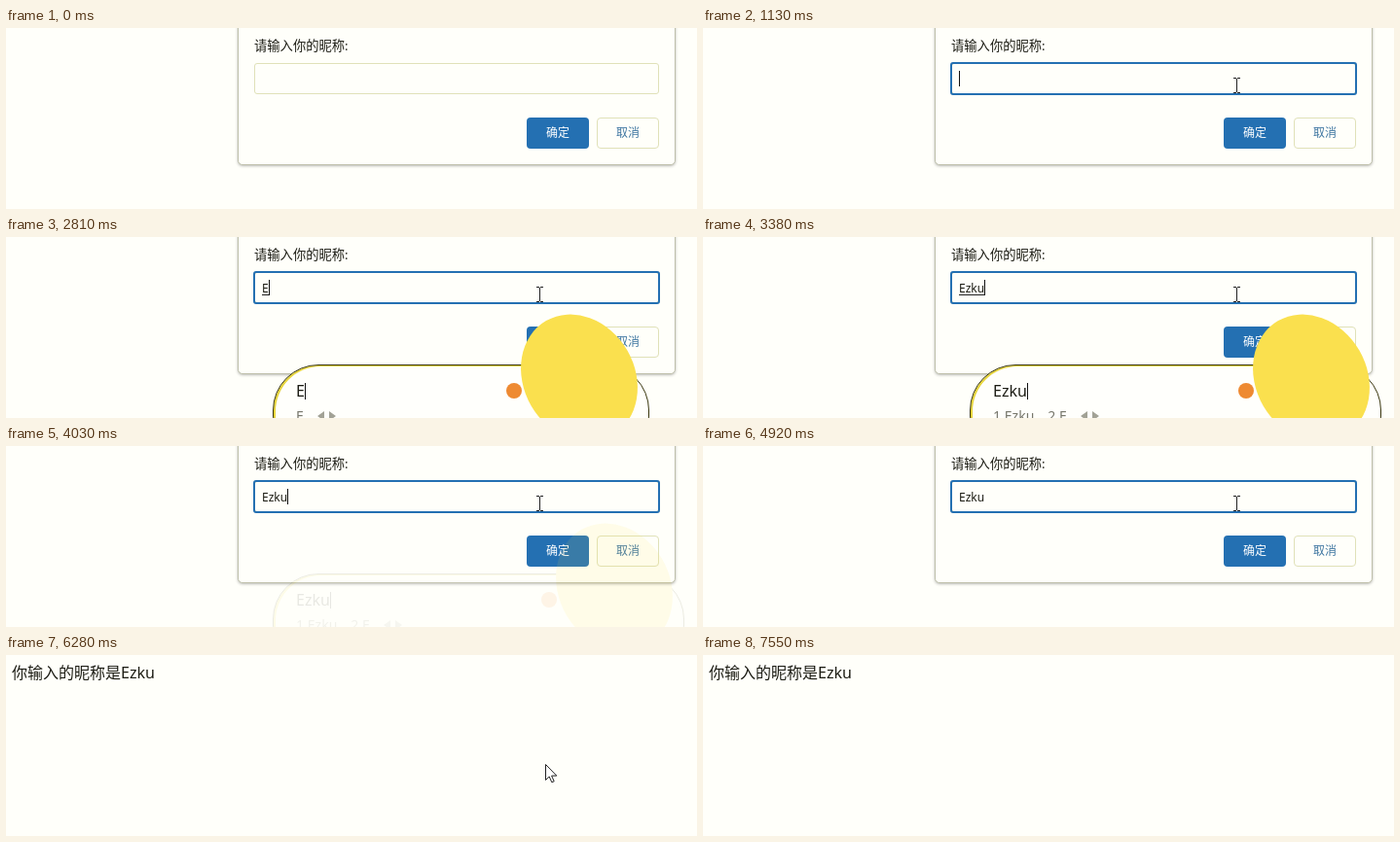
Write an HTML page that moves like this. It is 710 px wide and 186 px high and loops after 8.49 s.

```html
<!DOCTYPE html>
<html lang="zh-CN">
<head>
<meta charset="utf-8">
<title>昵称输入</title>
<style>
  :root { --paper: #fffffa; --blue: #2470b2; --line: #e0e1b8; --loop: 8490ms; }
  html, body { margin: 0; width: 100%; height: 100%; overflow: hidden; background: var(--paper); }
  body { font: 16px/20px 'Noto Sans', 'Noto Sans CJK SC', sans-serif; color: #1c1c14; white-space: nowrap; }
  .stage { position: absolute; left: 0; top: 0; width: 710px; height: 186px; overflow: hidden; }
  .stage div, .mascot, .badge { position: absolute; box-sizing: border-box; }

  /* Every animation shares one loop; percentages are ms / 84.9 */
  .anim, .k { animation: var(--loop) infinite both; }
  .cut, .k { animation-timing-function: step-end; }

  .dialog { inset: 0; animation-name: close; }
  .panel { left: 238px; top: -20px; width: 450px; height: 161px; border: 1px solid #bebfaa;
           border-radius: 5px; background: var(--paper); box-shadow: 0 1px 3px #0004; }
  .title { left: 255px; top: 8px; font-size: 13.3px; }
  .field { left: 255px; top: 36px; width: 416px; height: 32px; border: 1px solid var(--line); border-radius: 3px; }
  .focus { left: 254px; top: 35px; width: 418px; height: 34px; border: 2px solid var(--blue);
           border-radius: 3px; animation-name: focus; }
  .button { top: 92px; width: 64px; height: 32px; border-radius: 4px; font-size: 12px; line-height: 32px; text-align: center; }
  .ok { left: 535px; background: var(--blue); color: #fff; }
  .cancel { left: 607px; border: 1px solid var(--line); line-height: 30px; color: #3d75a0; }

  .entry { left: 263px; top: 46px; height: 14px; font-size: 12px; line-height: 14px;
           border-bottom: 1px solid transparent; animation-name: underline; }
  .caret { right: -1px; top: -2px; width: 1px; height: 16px; background: #111; }
  .entry .caret { animation-name: blink; }

  /* A key's letters take up room only once it has been pressed */
  .k { font-style: normal; line-height: 0; }
  .k1 { animation-name: key1; }
  .k2 { animation-name: key2; }
  .k3 { animation-name: key3; }
  .k4 { animation-name: key4; }

  .popup { inset: 0; animation-name: popup; }
  .pill { left: 274px; top: 131px; height: 100px; border: 1px solid #38350c; border-radius: 47px;
          background: #fffffc; box-shadow: inset 2px 1px 0 #e6d43c; animation-name: widen; }
  .compose { left: 23px; top: 16px; }
  .compose .caret { top: 2px; height: 17px; }
  .choices { left: 23px; top: 43px; font-size: 14px; line-height: 18px; color: #77776c; }
  .second { margin-left: 1em; }
  .pages { margin-left: 14px; fill: #a2a296; }
  .badge { right: 130px; top: 18px; width: 16px; height: 16px; border-radius: 50%; background: #ee8a32; }
  .mascot { right: 14px; top: -55px; width: 114px; height: 136px; border-radius: 50%;
            background: #fae04e; transform: rotate(-30deg); }

  .result { left: 6px; top: 8px; animation-name: result; }
  .pointer { left: 0; top: 0; animation-name: move; animation-timing-function: ease-in-out; }
  .pointer svg { position: absolute; overflow: visible; }
  .arrow { animation-name: arrow; }
  .beam { animation-name: beam; }

  @keyframes close { 0%, 69.61% { opacity: 1 } 73.97%, 100% { opacity: 0 } }
  @keyframes focus { 0%, 12.13% { opacity: 0 } 13.2%, 100% { opacity: 1 } }
  @keyframes underline { 0% { border-color: transparent } 30.39% { border-color: #222 } 44.76%, 100% { border-color: transparent } }
  @keyframes blink {
    0% { opacity: 0 } 12.13% { opacity: 1 } 17.67% { opacity: 0 } 24.26% { opacity: 1 }
    53% { opacity: 0 } 59.13% { opacity: 1 } 65.37%, 100% { opacity: 0 }
  }
  @keyframes key1 { 0% { font-size: 0 } 30.39%, 100% { font-size: 1em } }
  @keyframes key2 { 0% { font-size: 0 } 35.33%, 100% { font-size: 1em } }
  @keyframes key3 { 0% { font-size: 0 } 36.98%, 100% { font-size: 1em } }
  @keyframes key4 { 0% { font-size: 0 } 39.8%, 100% { font-size: 1em } }
  @keyframes popup { 0%, 30.39% { opacity: 0 } 33%, 44.76% { opacity: 1 } 49.12%, 100% { opacity: 0 } }
  @keyframes widen { 0% { width: 387px } 35.33% { width: 403px } 36.98% { width: 415px } 39.8%, 100% { width: 423px } }
  @keyframes result { 0% { opacity: 0 } 71.8%, 100% { opacity: 1 } }
  @keyframes move {
    0%, 2.24% { transform: translate(562px, -20px) }
    9.89%, 60.31% { transform: translate(548px, 59px) }
    67.37%, 82.21% { transform: translate(554px, 112px) }
    88.9%, 100% { transform: translate(572px, 190px) }
  }
  @keyframes arrow { 0% { opacity: 1 } 7% { opacity: 0 } 62.3%, 100% { opacity: 1 } }
  @keyframes beam { 0% { opacity: 0 } 7% { opacity: 1 } 62.3%, 100% { opacity: 0 } }
</style>
</head>
<body>
<div class="stage">
  <div class="result anim cut">你输入的昵称是Ezku</div>

  <div class="dialog anim">
    <div class="panel"></div>
    <div class="title">请输入你的昵称:</div>
    <div class="field"></div>
    <div class="focus anim"></div>
    <div class="entry anim cut"><i class="k k1">E</i><i class="k k2">z</i><i class="k k3">k</i><i class="k k4">u</i><div class="caret anim cut"></div></div>
    <div class="button ok">确定</div>
    <div class="button cancel">取消</div>
  </div>

  <div class="popup anim">
    <div class="pill anim cut">
      <div class="compose"><i class="k k1">E</i><i class="k k2">z</i><i class="k k3">k</i><i class="k k4">u</i><div class="caret"></div></div>
      <div class="choices"><i class="k k2">1.</i><i class="k k1">E</i><i class="k k2">z</i><i class="k k3">k</i><i class="k k4">u</i><i class="k k2 second">2.E</i><svg class="pages" width="20" height="10"><path d="M7 0V10L0 5ZM12 0V10L19 5Z"/></svg></div>
      <span class="badge"></span>
      <span class="mascot"></span>
    </div>
  </div>

  <div class="pointer anim">
    <svg class="arrow anim cut" width="13" height="20"><path d="M.5 .5V16.5L4.2 13L6.8 18.8L9.2 17.8L6.6 12.1H11.8Z" fill="#fff" stroke="#222"/></svg>
    <svg class="beam anim cut" width="8" height="16"><path d="M-3 -7.5H0M1 -7.5H4M.5 -7V7M-3 7.5H0M1 7.5H4" fill="none" stroke="#222"/></svg>
  </div>
</div>
</body>
</html>
```
